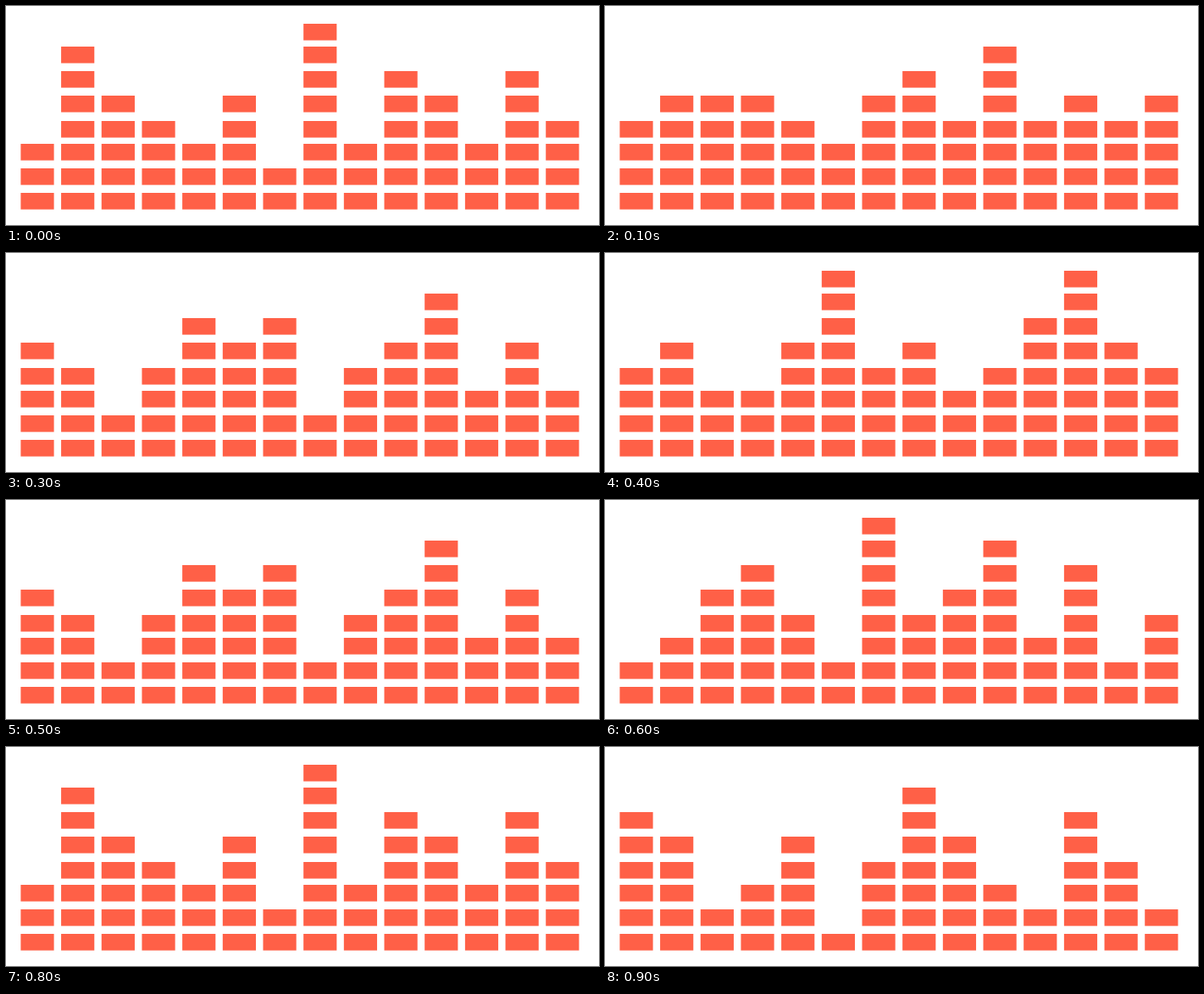
Recreate the animation shown at these times as an HTML page with a canvas. Size 700 by 259 pixels, loop 1000 ms.

```html
<!DOCTYPE html>
<html lang="en">
<head>
<meta charset="utf-8">
<title>Equalizer</title>
<style>
  html, body { margin: 0; width: 100%; height: 100%; overflow: hidden; background: #fff; }
  canvas { display: block; }
</style>
</head>
<body>
<canvas id="stage" width="700" height="259"></canvas>
<script>
const ctx = document.getElementById('stage').getContext('2d');

const STEP = 100;
const LEFT = 17.4, PITCH = 47.68, BAR_W = 39.2, BAR_H = 19.6;
const ROWS = [221, 192, 163, 136, 106, 77, 48, 21];

// One digit per column: the number of lit blocks.
const POSES = [
  '65235147532642',
  '37543528365364',
  '45554356474545',
  '23564284573624',
  '54246562457353',
  '45335845346854'
];
// The poses play forwards, then backwards.
const ORDER = [1, 2, 3, 4, 5, 4, 3, 2, 1, 0];

function draw(pose) {
  ctx.fillStyle = '#fff';
  ctx.fillRect(0, 0, 700, 259);
  ctx.fillStyle = '#ff6047';
  [...pose].forEach((level, col) => {
    for (let row = 0; row < +level; row++) {
      ctx.fillRect(LEFT + col * PITCH, ROWS[row], BAR_W, BAR_H);
    }
  });
}

function tick() {
  const step = Math.floor(performance.now() / STEP) % ORDER.length;
  draw(POSES[ORDER[step]]);
  requestAnimationFrame(tick);
}
tick();
</script>
</body>
</html>
```
